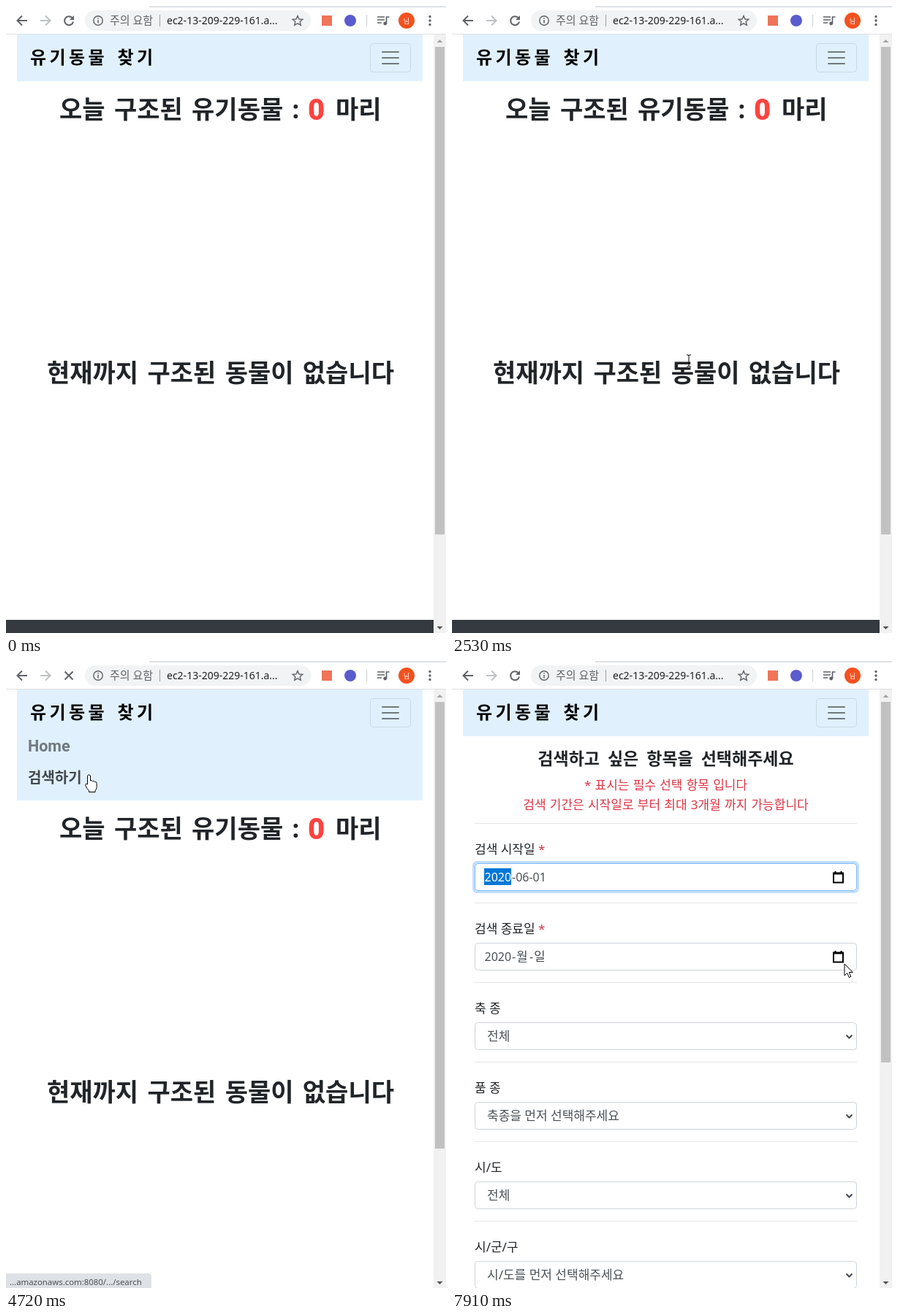
Animation of 602x859 px, one loop 8000 ms. Source, as an HTML page:

```html
<!DOCTYPE html>
<html lang="ko">
<head>
<meta charset="utf-8">
<title>유기동물 찾기</title>
<style>
html, body { margin: 0; width: 100%; height: 100%; overflow: hidden; background: #fff; }
svg { display: block; width: 602px; height: 859px; font: 17px "Noto Sans", "Noto Sans CJK KR", sans-serif; fill: #212529; }
text { white-space: pre; }
.icon { fill: none; stroke: #5f6368; stroke-width: 2; }
.title { font-weight: 700; font-size: 34px; word-spacing: 3.5px; }
.subtitle { font-weight: 900; font-size: 23px; word-spacing: 5px; text-anchor: middle; }
.rounded { font-family: Roboto, sans-serif; }
.field { fill: #fff; stroke: #ced4da; }
.value { fill: #495057; }
.red { fill: #dc3545; }
.mid { text-anchor: middle; }
.pick { font-size: 13px; text-anchor: middle; }
.pointer path { fill: #fff; stroke: #000; stroke-linejoin: round; }

/* One 8 s clock for everything: 1% = 80 ms */
.anim { animation: 8s step-end infinite; }
.flash { opacity: 0; }
#home { animation-name: home; }
#thumb { animation-name: thumb; }
#up { animation-name: up; }
#down { animation-name: down; }
#focus { animation-name: focus; }
#link { animation-name: link; }
#reload { animation-name: reload; }
#stop { animation-name: stop; }
#status { animation-name: status; }
#search { animation-name: search; }
#ring { animation-name: ring; }
#picker { animation-name: picker; }
#day { animation-name: day; }
#pointer { animation-name: move; }
#click { animation-name: click; }
#arrow { animation-name: arrow; }
#beam { animation-name: beam; }
#hand { animation-name: hand; }
.empty { animation-name: empty; }
.chosen { animation-name: chosen; }
#segment { animation-name: segment; }

@keyframes home {
  0%, 22%, 100% { transform: none; }
  13.75% { transform: translateY(-40px); }
  15% { transform: translateY(-100px); }
  16.5% { transform: translateY(-146px); }
  19.25% { transform: translateY(-110px); }
  20.6% { transform: translateY(-46px); }
  42.75% { transform: translateY(30px); }
  44% { transform: translateY(68px); }
  45.25% { transform: translateY(86px); }
  46.875% { transform: translateY(88px); }
}
@keyframes thumb {
  0%, 22%, 100% { transform: none; }
  13.75% { transform: translateY(32px); }
  15% { transform: translateY(80px); }
  16.5% { transform: translateY(117px); }
  19.25% { transform: translateY(88px); }
  20.6% { transform: translateY(37px); }
  42.75% { transform: scaleY(.97); }
  44% { transform: scaleY(.935); }
  45.25% { transform: scaleY(.918); }
  46.875% { transform: scaleY(.9162); }
  63.25% { transform: scaleY(.7395); }
}
@keyframes up { 0%, 22%, 100% { fill: #a3a3a3; } 13.75% { fill: #505050; } }
@keyframes down { 0%, 19.25%, 100% { fill: #505050; } 16.5% { fill: #a3a3a3; } }
@keyframes focus { 0%, 54.875%, 100% { opacity: 0; } 39.75% { opacity: 1; } }
@keyframes link { 0%, 100% { fill: #70787e; } 53.625% { fill: #43484c; } }
@keyframes reload { 0%, 63.25%, 100% { opacity: 1; } 59% { opacity: 0; } }
@keyframes stop { 0%, 63.25%, 100% { opacity: 0; } 59% { opacity: 1; } }
@keyframes status { 0%, 66%, 100% { opacity: 0; } 54.875% { opacity: 1; } }
@keyframes search { 0% { opacity: 0; } 63.25%, 100% { opacity: 1; } }
@keyframes ring { 0% { opacity: 0; } 78.375%, 100% { opacity: 1; } }
@keyframes picker { 0%, 90.625%, 100% { opacity: 0; } 78.375% { opacity: 1; } }
@keyframes day { 0%, 90.625%, 100% { opacity: 0; } 87.875% { opacity: 1; } }
@keyframes empty { 0% { opacity: 1; } 90.625%, 100% { opacity: 0; } }
@keyframes chosen { 0% { opacity: 0; } 90.625%, 100% { opacity: 1; } }
@keyframes segment { 0%, 90.625%, 100% { opacity: 0; } 77% { opacity: 1; } }
@keyframes click {
  0%, 42.75%, 59%, 78.375%, 90.625%, 100% { opacity: 0; }
  39.75%, 54.875%, 77%, 87.875% { opacity: 1; }
}
@keyframes arrow {
  0%, 30.375%, 39.75%, 53.625% { opacity: 0; }
  2.75%, 33.125%, 48.2%, 63.25%, 100% { opacity: 1; }
}
@keyframes beam { 0%, 33.125%, 100% { opacity: 0; } 30.375% { opacity: 1; } }
@keyframes hand { 0%, 48.2%, 63.25%, 100% { opacity: 0; } 39.75%, 53.625% { opacity: 1; } }
@keyframes move {
  0% { transform: translate(492px, 828px); }
  2.75% { transform: translate(492px, 828px); animation-timing-function: steps(4); }
  8.19% { transform: translate(415px, 205px); animation-timing-function: steps(3); }
  12.25% { transform: translate(343px, 549px); }
  19.25% { transform: translate(343px, 549px); animation-timing-function: steps(3); }
  24% { transform: translate(343px, 577px); }
  30.375% { transform: translate(335px, 540px); }
  31.625% { transform: translate(324px, 486px); animation-timing-function: steps(6); }
  39.75% { transform: translate(515px, 77px); }
  46.875% { transform: translate(515px, 77px); animation-timing-function: steps(5); }
  53.625% { transform: translate(113px, 156px); }
  66% { transform: translate(113px, 156px); animation-timing-function: steps(8, start); }
  76.85% { transform: translate(527px, 303px); }
  78.375% { transform: translate(527px, 303px); animation-timing-function: steps(7, start); }
  87.7% { transform: translate(101px, 400px); }
  90.625% { transform: translate(101px, 400px); animation-timing-function: steps(7, start); }
  100% { transform: translate(537px, 415px); }
}
</style>
</head>
<body>
<svg viewBox="0 0 602 859">
  <rect width="602" height="859" fill="#fff"/>

  <!-- Collapsible menu, covered by the sliding page below -->
  <rect x="15" y="103" width="555" height="88" fill="#e0f1fd"/>
  <g font-size="20" font-weight="600" fill="#70787e">
    <text class="rounded" x="30" y="124" font-size="21.500">Home</text>
    <text id="link" class="anim" x="30" y="167">검색하기</text>
  </g>

  <g id="home" class="anim">
    <rect y="103" width="585" height="1000" fill="#fff"/>
    <g class="title">
      <text x="73" y="154">오늘 구조된 유기동물 :</text>
      <text class="rounded" x="413" y="156" font-size="40" font-weight="900" fill="#ff4340">0</text>
      <text x="451" y="154">마리</text>
      <text x="56" y="515">현재까지 구조된 동물이 없습니다</text>
    </g>
    <rect y="841" width="585" height="164" fill="#343a40"/>
    <g font-size="16" fill="#6c757d">
      <text x="200" y="875">© 제 작 :</text>
      <text x="266" y="875" fill="#fff">Nuri Byeol Haet</text>
      <text x="135" y="931">© 소스코드 :</text>
      <text x="229" y="931" fill="#007bff">https://github.com/byeolnu58</text>
    </g>
  </g>

  <g id="search" class="anim flash">
    <rect y="103" width="585" height="756" fill="#fff"/>
    <text class="subtitle" x="292.5" y="142">검색하고 싶은 항목을 선택해주세요</text>
    <g class="red mid" word-spacing=".8">
      <text x="292.5" y="176">* 표시는 필수 선택 항목 입니다</text>
      <text x="292.5" y="203">검색 기간은 시작일로 부터 최대 3개월 까지 가능합니다</text>
    </g>
    <g id="rows"></g>
    <g id="ring" class="anim flash" fill="none">
      <rect x="29.5" y="275.5" width="526" height="41" rx="5" stroke="#bfdeff" stroke-width="3"/>
      <rect x="31.5" y="277.5" width="522" height="37" rx="4" stroke="#80bdff"/>
    </g>
    <g class="value">
      <g class="anim empty">
        <text y="302"><tspan x="46">연도</tspan><tspan x="80">-</tspan><tspan x="86">월</tspan><tspan x="104">-</tspan><tspan x="110">일</tspan></text>
        <text y="411"><tspan x="46">연도</tspan><tspan x="80">-</tspan><tspan x="86">월</tspan><tspan x="104">-</tspan><tspan x="110">일</tspan></text>
        <g id="segment" class="anim flash">
          <rect x="44" y="284" width="34" height="23" fill="#0078d7"/>
          <text x="46" y="302" fill="#fff">연도</text>
        </g>
      </g>
      <g class="anim chosen flash" font-size="16">
        <rect x="44" y="284" width="37" height="23" fill="#0078d7"/>
        <text x="44.5" y="302" fill="#fff">2020</text>
        <text x="82" y="302">-06-01</text>
        <text y="411"><tspan x="44.5">2020</tspan><tspan x="82">-</tspan><tspan x="88" font-size="17">월</tspan><tspan x="106">-</tspan><tspan x="112" font-size="17">일</tspan></text>
      </g>
    </g>
  </g>

  <!-- Navigation bar -->
  <rect x="15" y="39" width="555" height="64" fill="#e0f1fd"/>
  <text x="33" y="79" fill="#000" font-size="24" font-weight="600" letter-spacing="4.400" word-spacing="3">유기동물 찾기</text>
  <rect x="498.5" y="51.5" width="55" height="39" rx="4" fill="none" stroke="#c9d9e4"/>
  <path d="M515 63h22M515 71h22M515 79h22" stroke="#70787e" stroke-width="2" stroke-linecap="round"/>
  <rect id="focus" class="anim flash" x="499" y="52" width="54" height="38" rx="3" fill="none" stroke="#101010" stroke-width="2"/>

  <!-- Browser toolbar -->
  <rect width="602" height="39" fill="#fff"/>
  <path d="M196 0H602V2H196Z" fill="#dee1e6"/>
  <path d="M0 38.5H602" stroke="#dfe1e5"/>
  <g class="icon">
    <path d="M29 20H16M22 13.5 15.5 20l6.500 6.500"/>
    <path d="M47 20H60M54 13.5 60.500 20 54 26.500" stroke="#bdc1c6"/>
    <g id="reload" class="anim">
      <path d="M90.500 16A6 6 0 1 0 92 21.500"/>
      <path d="M93 13v6h-6Z" fill="#5f6368" stroke="none"/>
    </g>
    <path id="stop" class="anim flash" d="M80.500 14.500l11 11m0-11-11 11"/>
    <rect x="108" y="6" width="309" height="28" rx="14" fill="#f1f3f4" stroke="none"/>
    <circle cx="126" cy="20" r="6.200" stroke-width="1.400"/>
    <path d="M126 19v4.500M126 16v1.500" stroke-width="1.500"/>
    <path d="M210.500 12V28" stroke="#9aa0a6" stroke-width="1"/>
    <path d="M399 13.500l2 4.500 4.800.4-3.600 3.200 1.100 4.700-4.300-2.500-4.300 2.500 1.100-4.700-3.600-3.200 4.800-.4Z" stroke-width="1.400"/>
    <path d="M493.500 12V28" stroke="#cdd0d4" stroke-width="1"/>
    <path d="M508 15h10M508 19h10M508 23h6M520.500 24V15h4" stroke-width="1.700"/>
    <circle cx="518.700" cy="24" r="2.400" fill="#5f6368" stroke="none"/>
  </g>
  <text x="142" y="25" font-size="15" fill="#5f6368">주의 요함</text>
  <text x="220" y="25" font-size="14" fill="#202124">ec2-13-209-229-161.a...</text>
  <rect x="432" y="13" width="14" height="14" fill="#ef7458"/>
  <circle cx="471" cy="20" r="8" fill="#5b5bd0"/>
  <circle cx="548" cy="20" r="11" fill="#f4511e"/>
  <text class="mid" x="548" y="23.500" font-size="9" fill="#fff">님</text>
  <path d="M580 14.500h0m0 5.500h0m0 5.500h0" stroke="#5f6368" stroke-width="3.400" stroke-linecap="round"/>

  <!-- Scrollbar -->
  <rect x="585" y="39" width="17" height="820" fill="#f1f1f1"/>
  <path id="up" class="anim" d="M589.500 50h8l-4-4Z" fill="#a3a3a3"/>
  <path id="down" class="anim" d="M589.500 850h8l-4 4Z" fill="#505050"/>
  <g transform="translate(587 56)"><rect id="thumb" class="anim" width="13" height="668" fill="#c1c1c1"/></g>

  <g id="status" class="anim flash">
    <path d="M0 839H195q4 0 4 4V859H0Z" fill="#dee1e6"/>
    <text x="5" y="855" font-size="11.400" fill="#4b4f54">...amazonaws.com:8080/.../search</text>
  </g>

  <g id="picker" class="anim flash">
    <rect x="31.500" y="316.500" width="260" height="284" rx="2" fill="#fff" stroke="#bfbfbf"/>
    <rect id="day" class="anim flash" x="71" y="389" width="36" height="28" rx="2" fill="#0078d7" fill-opacity=".35"/>
    <text x="44" y="342" font-size="14" font-weight="600">2020년 06월</text>
    <path d="M129 335h8l-4 4Z"/>
    <path d="M246 342v-11m-4 4 4-4 4 4M272 331v11m-4-4 4 4 4-4" fill="none" stroke="#212529" stroke-width="1.500"/>
    <g id="days" class="pick"></g>
    <text x="44" y="583" font-size="13" fill="#0067c0">오늘</text>
  </g>

  <g id="pointer" class="anim pointer">
    <circle id="click" class="anim flash" r="12" fill="#ffff00" fill-opacity=".55"/>
    <path id="arrow" class="anim flash" d="M0 0V16L3.700 12.500 6.300 18.500 8.800 17.400 6.300 11.500H11.300Z"/>
    <path id="beam" class="anim flash" d="M-3-8H-1L0-7 1-8H3M0-7V7M-3 8H-1L0 7 1 8H3" style="fill:none"/>
    <path id="hand" class="anim flash" d="M-1.500 12V2q0-2 2-2t2 2v6q2-1 3 .7q2-.8 3 .8q2.600-.3 2.600 2v5q0 3-2 5v2H.5v-2q-3-2-5-8q0-2 3-.5Z"/>
  </g>
</svg>
<script>
const fill = (id, parts) => { document.getElementById(id).innerHTML = parts.join(''); };

const rows = [
  ['검색 시작일'], ['검색 종료일'], ['축 종', '전체'],
  ['품 종', '축종을 먼저 선택해주세요'], ['시/도', '전체'], ['시/군/구', '시/도를 먼저 선택해주세요']
];
const calendarIcon = '<path d="M522 290.5h13v13h-13ZM522 291.5h13M524.5 288v3M532.5 288v3" fill="none" stroke="#000" stroke-width="2"/>';
const chevron = '<path d="M539.500 294.500l4 4 4-4" fill="none" stroke="#444b52" stroke-width="2"/>';

fill('rows', rows.map(([label, value], i) => `<g transform="translate(0 ${109 * i})">
  <path d="M31 222.500H554" stroke="#e5e5e5"/>
  <text x="31" y="264">${label}${value ? '' : ' <tspan class="red">*</tspan>'}</text>
  <rect class="field" x="31.500" y="277.500" width="522" height="37" rx="4"/>
  ${value ? `<text class="value" x="48" y="302">${value}</text>${chevron}` : calendarIcon}</g>`));

const cellX = col => 53 + 36 * col;
const weekdays = [...'일월화수목금토'].map((name, col) =>
  `<text x="${cellX(col)}" y="380" fill="#70757a">${name}</text>`);
const days = Array.from({ length: 42 }, (_, i) => {
  const date = new Date(2020, 4, 31 + i);
  const color = date.getMonth() === 5 ? '#212529' : '#a8abae';
  return `<text x="${cellX(i % 7)}" y="${408 + 28 * Math.floor(i / 7)}" fill="${color}">${date.getDate()}</text>`;
});
fill('days', [...weekdays, ...days]);
</script>
</body>
</html>
```
